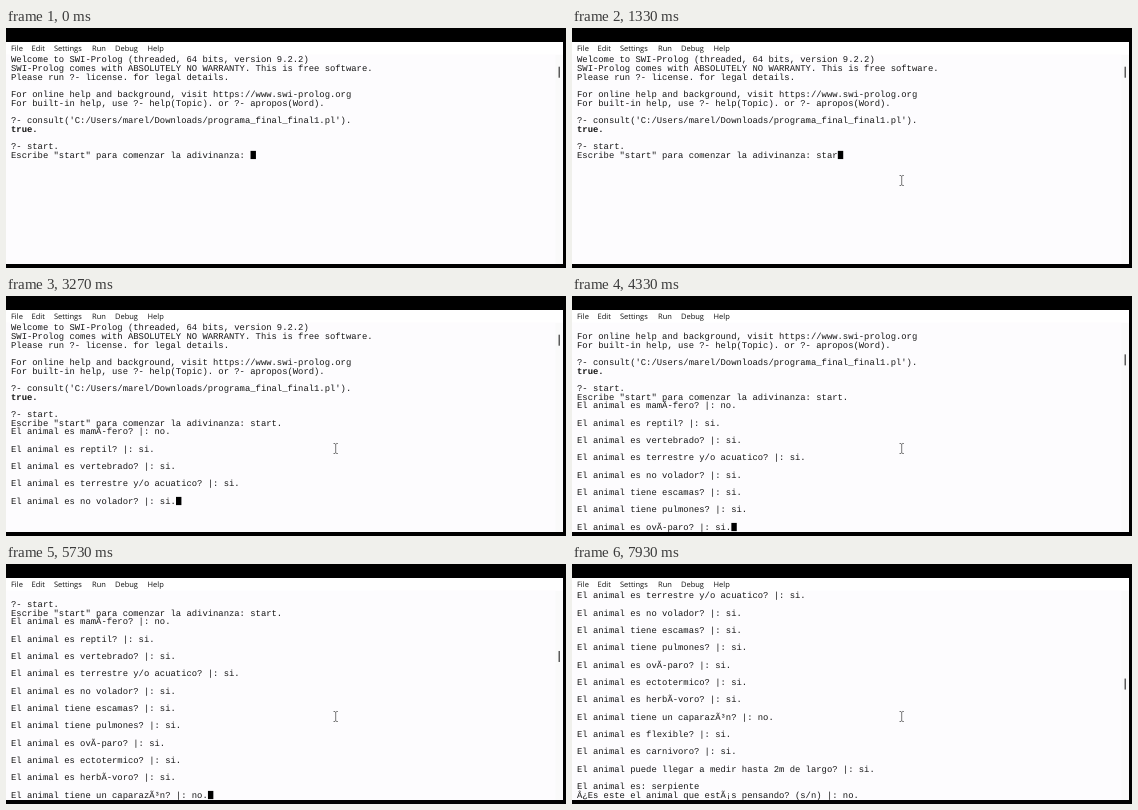
Write an HTML page that moves like this. It is 560 px wide and 240 px high and loops after 8000 ms.

```html
<!DOCTYPE html>
<html lang="es">
<head>
<meta charset="utf-8">
<title>Prolog console</title>
<style>
html, body { margin: 0; width: 100%; height: 100%; overflow: hidden; background: #000; }
svg { display: block; width: 100%; height: 100%; }
text { white-space: pre; text-rendering: geometricPrecision; }
.menu { font: 7.5px "Open Sans", sans-serif; fill: #111; }
.term { font: 8.87px "Liberation Mono", "Courier New", monospace; fill: #161616; }
</style>
</head>
<body>
<svg viewBox="0 0 560 240">
  <rect width="560" height="240" fill="#000"/>
  <rect y="14" width="557" height="222" fill="#fdfcfe"/>
  <rect y="14" width="557" height="12.5" fill="#fff"/>
  <rect x="549.5" y="27" width="7.5" height="209" fill="#fafafa"/>
  <g id="menu" class="menu"></g>
  <g id="rows" class="term"></g>
  <rect id="caret" width="5.4" height="8.2" fill="#000"/>
  <rect id="thumb" x="552.6" width="1.2" height="11" fill="#333"/>
  <path id="beam" d="M327.5 147.5h1.5l.7.7.7-.7h1.5M329.7 148v9M327.5 157.5h1.5l.7-.7.7.7h1.5" fill="none" stroke="#555" stroke-width=".8"/>
</svg>
<script>
const LOOP = 8000, ROWS = 24, LEFT = 5, CHAR = 5.323, LINE = 8.67, BASE = 34.3;
const $ = id => document.getElementById(id);

const intro = [
  'Welcome to SWI-Prolog (threaded, 64 bits, version 9.2.2)',
  'SWI-Prolog comes with ABSOLUTELY NO WARRANTY. This is free software.',
  'Please run ?- license. for legal details.',
  '',
  'For online help and background, visit https://www.swi-prolog.org',
  'For built-in help, use ?- help(Topic). or ?- apropos(Word).',
  '',
  "?- consult('C:/Users/marel/Downloads/programa_final_final1.pl').",
  'true.',
  '',
  '?- start.'
];

// [lines printed before, prompt, answer, first key, enter]
const ask = (q, answer, from, to, before = ['']) =>
  [before, `El animal ${q}? |: `, answer, from, to];

const steps = [
  [[], 'Escribe "start" para comenzar la adivinanza: ', 'start.', 1000, 1630],
  ask('es mamÃ-fero', 'no.', 1730, 1930, []),
  ask('es reptil', 'si.', 2040, 2270),
  ask('es vertebrado', 'si.', 2380, 2620),
  ask('es terrestre y/o acuatico', 'si.', 2730, 2980),
  ask('es no volador', 'si.', 3090, 3340),
  ask('tiene escamas', 'si.', 3450, 3700),
  ask('tiene pulmones', 'si.', 3800, 4050),
  ask('es ovÃ-paro', 'si.', 4150, 4420),
  ask('es ectotermico', 'si.', 4620, 4880),
  ask('es herbÃ-voro', 'si.', 5090, 5340),
  ask('tiene un caparazÃ³n', 'no.', 5560, 5800),
  ask('es flexible', 'si.', 5950, 6190),
  ask('es carnivoro', 'si.', 6330, 6570),
  ask('puede llegar a medir hasta 2m de largo', 'si.', 6690, 6980),
  [['', 'El animal es: serpiente'],
    'Â¿Es este el animal que estÃ¡s pensando? (s/n) |: ', 'no.', 7450, 7870]
];

function add(parent, x, y, content = '') {
  const el = document.createElementNS('http://www.w3.org/2000/svg', 'text');
  el.setAttribute('x', x);
  el.setAttribute('y', y);
  el.textContent = content;
  parent.append(el);
  return el;
}

[['File', 5], ['Edit', 25.5], ['Settings', 48], ['Run', 86], ['Debug', 109], ['Help', 141.5]]
  .forEach(([name, x]) => add($('menu'), x, 23.2, name));
const rows = Array.from({ length: ROWS }, (_, i) => add($('rows'), LEFT, BASE + i * LINE));

function typed(answer, from, to, t) {
  if (t < from) return '';
  const step = (to - from) / (answer.length + 1);
  return answer.slice(0, Math.floor((t - from) / step) + 1);
}

function screen(t) {
  const lines = [...intro];
  for (const [before, prompt, answer, from, to] of steps) {
    lines.push(...before, prompt + typed(answer, from, to, t));
    if (t < to) break;
  }
  return lines;
}

function draw(t) {
  const lines = screen(t);
  const top = Math.max(0, lines.length - ROWS);
  rows.forEach((row, i) => {
    const line = lines[top + i] || '';
    if (row.textContent !== line) row.textContent = line;
    row.setAttribute('font-weight', line === 'true.' ? 700 : 400);
  });
  const last = lines.length - 1;
  $('caret').setAttribute('x', LEFT + lines[last].length * CHAR);
  $('caret').setAttribute('y', BASE + (last - top) * LINE - 6.8);
  $('caret').style.display = t < steps[steps.length - 1][4] ? '' : 'none';
  $('thumb').setAttribute('y', 38.7 + 177 * top / (top + ROWS));
  $('beam').style.display = t < 400 ? 'none' : '';
}

let start;
function tick(now) {
  start ??= now;
  draw((now - start) % LOOP);
  requestAnimationFrame(tick);
}
draw(0);
requestAnimationFrame(tick);
</script>
</body>
</html>
```
